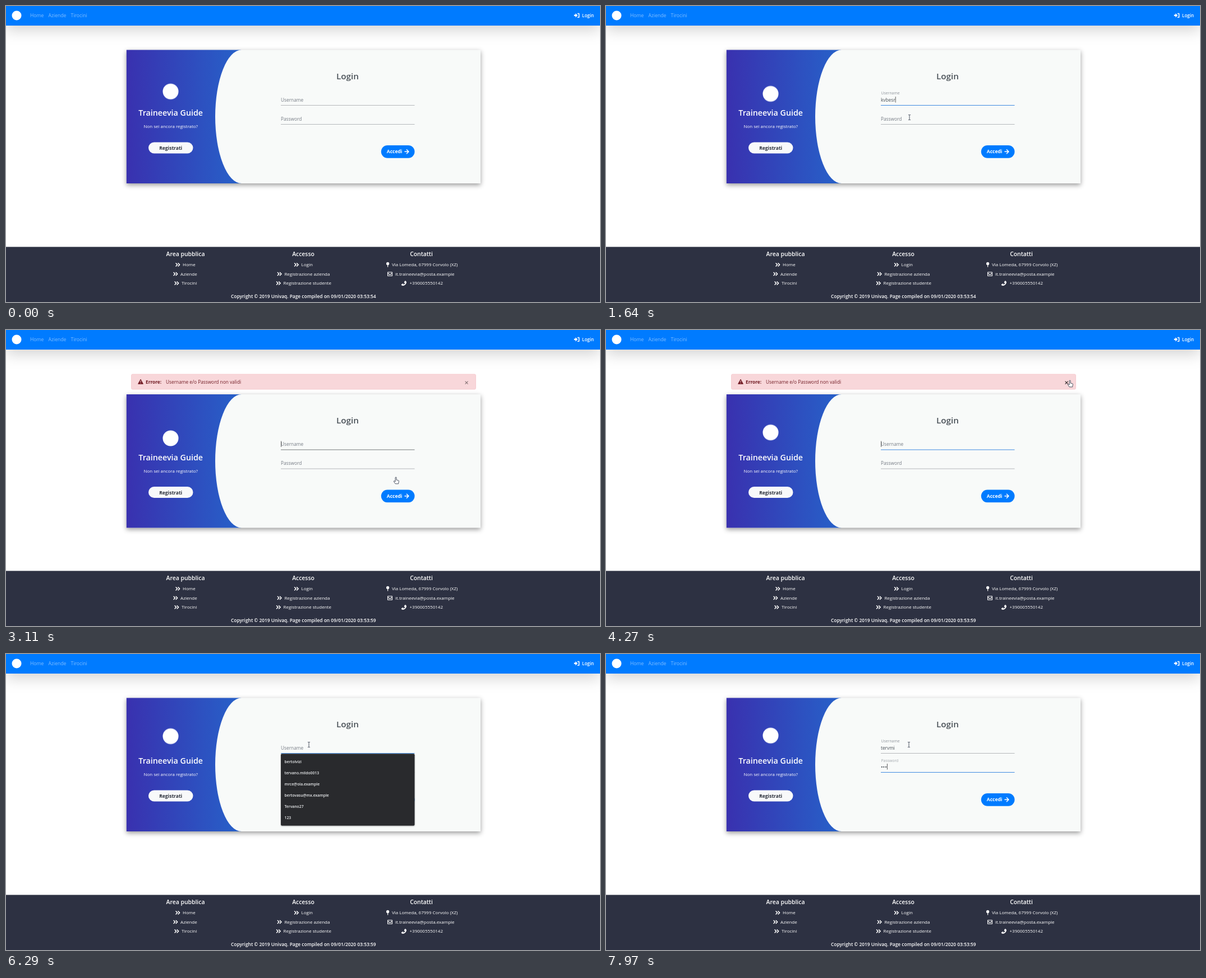
These frames come from a looping animation (1059x529 px, 8000 ms). An HTML page:

```html
<!DOCTYPE html>
<html lang="it">
<head>
<meta charset="utf-8">
<title>Login</title>
<style>
html, body { margin: 0; width: 100%; height: 100%; overflow: hidden; background: #fff; }
svg { display: block; width: 1059px; height: 529px; }
text { font: 8.3px "Open Sans", "Noto Sans", sans-serif; white-space: pre; }
.bold { font-weight: 600; }
.mid { text-anchor: middle; }
.nav { font-size: 8.6px; fill: #fff; fill-opacity: .5; }
.bar { fill: #007bff; filter: drop-shadow(0 8.8px 13px rgba(0,0,0,.175)); }
.box { fill: #f8faf9; filter: drop-shadow(0 3.5px 4px rgba(0,0,0,.4)); }
.brand { font-size: 14.25px; font-weight: 600; fill: #fff; }
.sub { font-size: 7.95px; fill: #fff; }
.title { font-size: 15.2px; font-weight: 600; fill: #495057; }
.button { font-size: 8.5px; font-weight: 700; }
.hint { fill: #757b84; }
.typed { fill: #495057; }
.float { font-size: 6.85px; fill: #8f959c; opacity: 0; }
.line { stroke: #adb0b4; stroke-width: .9; }
.focus .line { stroke: #3f8ae0; stroke-width: 1.2; }
.focus.fresh .line { stroke: #75787d; }
.caret { stroke: #333; stroke-width: .8; visibility: hidden; }
.filled .hint { visibility: hidden; }
.filled .float { opacity: 1; transition: opacity .3s; }
.popup text { font-size: 6.8px; font-weight: 600; fill: #eceef0; }
.alert text { fill: #721c24; }
.cross { stroke: #000; stroke-width: 1.2; opacity: .45; }
.hover .cross { opacity: .8; }
.foot text { font-size: 8px; fill: #fff; }
.foot .head { font-size: 10.4px; font-weight: 600; text-anchor: middle; }
.foot .note { font-size: 8.4px; }
.icon { fill: none; stroke: #fff; stroke-width: 1.5; stroke-linejoin: round; stroke-linecap: round; }
.cursor { animation: move 8s linear infinite; }
.cursor path { fill: #fff; stroke: #222b3d; stroke-width: .8; stroke-linejoin: round; }
.mark { fill: #fff; animation: bob 2s ease -1230ms infinite; }
.reloaded .mark { animation-delay: -1830ms; }
@keyframes bob { 50% { transform: translateY(11.5px); } }
@keyframes move {
  0%, 1.9% { transform: translate(915px, 455px); opacity: 0; }
  1.91% { transform: translate(915px, 455px); opacity: 1; }
  7% { transform: translate(620px, 200px); }
  10%, 17.5% { transform: translate(540px, 166px); }
  19.75%, 29.75% { transform: translate(541px, 199px); }
  32.1% { transform: translate(575px, 222px); }
  34.4%, 40% { transform: translate(695px, 263px); }
  43.6% { transform: translate(745px, 188px); }
  47.5%, 62.2% { transform: translate(827px, 90px); }
  63.4%, 64.1% { transform: translate(780px, 110px); }
  65% { transform: translate(715px, 127px); }
  68.75%, 100% { transform: translate(540px, 162px); opacity: 1; }
}
</style>
</head>
<body>
<svg id="page" viewBox="0 0 1059 529">
  <defs>
    <linearGradient id="sky" gradientUnits="userSpaceOnUse" x1="215" x2="846"><stop stop-color="#3931af"/><stop offset="1" stop-color="#00c6ff"/></linearGradient>
    <path id="chevrons" class="icon" d="M0-2.6L2.6 0L0 2.6M4-2.6L6.6 0L4 2.6"/>
  </defs>

  <rect class="bar" width="1059" height="35"/>
  <circle cx="19" cy="17" r="8.5" fill="#fff"/>
  <text class="nav" x="43" y="20">Home</text>
  <text class="nav" x="75.5" y="20">Aziende</text>
  <text class="nav" x="115.5" y="20">Tirocini</text>
  <path d="M1012.8 15.5H1015.3V13.1L1019.2 16.8L1015.3 20.5V18.1H1012.8Z" fill="#fff"/>
  <path class="icon" d="M1019.3 13.4H1021.6V20.2H1019.3"/>
  <text class="bold" x="1027" y="20" fill="#fff" style="font-size:8.1px">Login</text>

  <g id="alert" class="alert">
    <rect x="223.5" y="79" width="614" height="27" rx="2.2" fill="#f8d7da" stroke="#f5c6cb" stroke-width=".8"/>
    <path d="M240 88.2L244.4 96.3H235.6Z" fill="#721c24" stroke="#721c24" stroke-linejoin="round"/>
    <path d="M240 90.4V93.4M240 94.6V95.6" stroke="#f8d7da"/>
    <text x="249" y="95.9" style="font-weight:700">Errore:</text>
    <text x="285" y="95.9">Username e/o Password non validi</text>
    <rect id="ring" x="805.5" y="79.5" width="32" height="26" fill="none" stroke="#a9a0c0"/>
    <path class="cross" d="M818.6 91.6L823.6 96.6M823.6 91.6L818.6 96.6"/>
  </g>

  <g id="card">
    <rect class="box" x="214.8" y="78.5" width="631.2" height="238.5"/>
    <path d="M214.8 78.5H420A47 119.25 0 0 0 420 317H214.8Z" fill="url(#sky)"/>
    <circle class="mark" cx="293.5" cy="145.5" r="14"/>
    <text class="brand mid" x="293.7" y="196.2">Traineevia Guide</text>
    <text class="sub mid" x="293.7" y="218.4">Non sei ancora registrato?</text>
    <rect x="254" y="243.5" width="79.5" height="20" rx="10" fill="#f8f9fa"/>
    <text class="button mid" x="293.7" y="257.3" fill="#2b303b">Registrati</text>

    <text class="title mid" x="609" y="130.8">Login</text>
    <g id="user">
      <text class="float" x="490.5" y="157.6">Username</text>
      <text class="hint" x="490" y="170.6">Username</text>
      <text class="typed" x="490" y="170.6"></text>
      <path class="line" d="M490 177.5H728.5"/>
      <path class="caret" d="M490.6 162V172.5"/>
    </g>
    <g id="pass">
      <text class="float" x="490.5" y="193">Password</text>
      <text class="hint" x="490" y="204.9">Password</text>
      <text class="typed" x="490" y="205.2" style="font-size:9.6px"></text>
      <path class="line" d="M490 211.5H728.5"/>
      <path class="caret" d="M490.6 196V206.5"/>
    </g>
    <rect x="668.8" y="249" width="59.7" height="22.7" rx="11.35" fill="#007bff"/>
    <text class="button" x="678.8" y="263.4" fill="#fff">Accedi</text>
    <path class="icon" d="M711 260.3H717.6M714.4 256.8L717.9 260.3L714.4 263.8"/>
    <g id="popup" class="popup">
      <rect x="490" y="178.3" width="238.5" height="128.5" rx="2" fill="#292a2d" style="filter:drop-shadow(0 1px 1px rgba(0,0,0,.3))"/>
    </g>
  </g>

  <g class="foot">
    <rect y="430.5" width="1059" height="98.5" fill="#2d3142"/>
    <text class="head" x="320" y="447">Area pubblica</text>
    <text class="head" x="530" y="447">Accesso</text>
    <text class="head" x="740.5" y="447">Contatti</text>
    <g id="links"></g>
    <g fill="#fff">
      <circle cx="680.6" cy="460.4" r="2.6"/><path d="M680 462H681.2V466.6H680Z"/>
    </g>
    <path class="icon" style="stroke-width:1.1" d="M680.6 475.7H688.4V482.3H680.6ZM680.6 477.4L684.5 480.3L688.4 477.4"/>
    <path class="icon" style="stroke-width:2" d="M712 492.2L713 493.6C712.8 496.5 710.2 499 707.2 499.1L706 498M711.6 492.4L710.8 494M705.8 498.2L707.6 497.1"/>
    <text x="688" y="465.4">Via Lomeda, 67999 Corvolo (XZ)</text>
    <text x="694" y="481.9">it.traineevia@posta.example</text>
    <text x="719.5" y="498.4">+390005550142</text>
    <text class="note bold mid" x="530.3" y="522.3">Copyright © 2019 Univaq. Page compiled on 09/01/2020 03:53:<tspan id="secs">54</tspan></text>
  </g>

  <g class="cursor">
    <path id="arrow" d="M0 0V9.2L2.1 7.3L3.5 10.6L4.9 10L3.5 6.8H6.2Z"/>
    <path id="beam" style="fill:none" d="M-2-4.5H-.5L0-4L.5-4.5H2M0-4V4M-2 4.5H-.5L0 4L.5 4.5H2"/>
    <path id="hand" d="M-.9 1A1 1 0 0 1 1.1 1V5L4.8 5.9Q5.6 6.2 5.4 7.2L4.6 11.8H-.8L-3.6 7.8Q-3.8 6.3-2.3 6.8L-.9 8Z"/>
  </g>
</svg>
<script>
const LOOP = 8000, RELOAD = 2980, CLOSE = 5020, GONE = 5175;
const $ = id => document.getElementById(id);
const show = (el, on) => el.style.visibility = on ? 'visible' : 'hidden';

function add(parent, tag, attrs, text = '') {
  const el = document.createElementNS('http://www.w3.org/2000/svg', tag);
  for (const key in attrs) el.setAttribute(key, attrs[key]);
  el.textContent = text;
  parent.append(el);
}

['bertolvizi', 'tervano.mildo0013', 'mrce@ola.example', 'bertovasu@mx.example', 'Tervano27', '123']
  .forEach((name, i) => add($('popup'), 'text', { x: 496.5, y: 195.3 + 19.95 * i }, name));

[[302.5, 'Home', 0], [298.5, 'Aziende', 1], [300.5, 'Tirocini', 2],
 [514, 'Login', 0], [483.8, 'Registrazione azienda', 1], [482, 'Registrazione studente', 2]]
  .forEach(([x, label, row]) => {
    const y = 462.4 + 16.5 * row;
    add($('links'), 'use', { href: '#chevrons', transform: `translate(${x + .5} ${y})` });
    add($('links'), 'text', { x: x + 12.6, y: y + 3 }, label);
  });

// [from ms, value]
const focusSteps = [[0, ''], [900, 'user'], [1790, 'pass'], [2800, ''], [3080, 'user'],
  [4990, ''], [5650, 'user'], [7650, 'pass']];
const cursorSteps = [[0, 'arrow'], [720, 'beam'], [2480, 'arrow'], [2680, 'hand'], [3220, 'arrow'],
  [3760, 'hand'], [5010, 'arrow'], [5380, 'beam']];
// [first key ms, ms per key, text]
const typing = {
  user: [[1220, 75, 'kvbesr'], [7000, 95, 'tervmi']],
  pass: [[1950, 80, '•••••'], [7810, 65, '•••']]
};

const current = (steps, t) => steps.filter(s => s[0] <= t).pop();

function field(id, t, focus) {
  const [first, gap, text] = typing[id][t < RELOAD ? 0 : 1];
  const count = Math.max(0, Math.min(text.length, Math.floor((t - first) / gap) + 1));
  const box = $(id), typed = box.querySelector('.typed'), caret = box.querySelector('.caret');
  const value = text.slice(0, count);
  if (typed.textContent !== value) typed.textContent = value;
  const active = focus[1] === id;
  box.classList.toggle('filled', count > 0);
  box.classList.toggle('focus', active);
  box.classList.toggle('fresh', active && t < 3180 && t >= RELOAD);
  const lastKey = count ? first + (count - 1) * gap : focus[0];
  show(caret, active && Math.floor((t - lastKey) / 530) % 2 === 0);
  caret.setAttribute('transform', `translate(${count ? typed.getComputedTextLength() : 0} 0)`);
}

function render(t) {
  const error = t >= RELOAD && t < GONE;
  const focus = current(focusSteps, t);
  $('page').classList.toggle('reloaded', t >= RELOAD);
  $('card').setAttribute('transform', `translate(0 ${error ? 36.5 : 0})`);
  $('alert').style.opacity = error ? Math.min(1, 1 - (t - CLOSE) / 150) : 0;
  $('alert').classList.toggle('hover', t > 3780 && t < 5040);
  show($('ring'), error && t >= 4990);
  $('secs').textContent = t < RELOAD ? '54' : '59';
  field('user', t, focus);
  field('pass', t, focus);
  show($('popup'), (t >= 960 && t < 1220) || (t >= 5750 && t < 7000));
  const shape = current(cursorSteps, t)[1];
  for (const id of ['arrow', 'beam', 'hand']) show($(id), id === shape);
}

let start;
function tick(now) {
  start ??= now;
  render((now - start) % LOOP);
  requestAnimationFrame(tick);
}
render(0);
requestAnimationFrame(tick);
</script>
</body>
</html>
```
